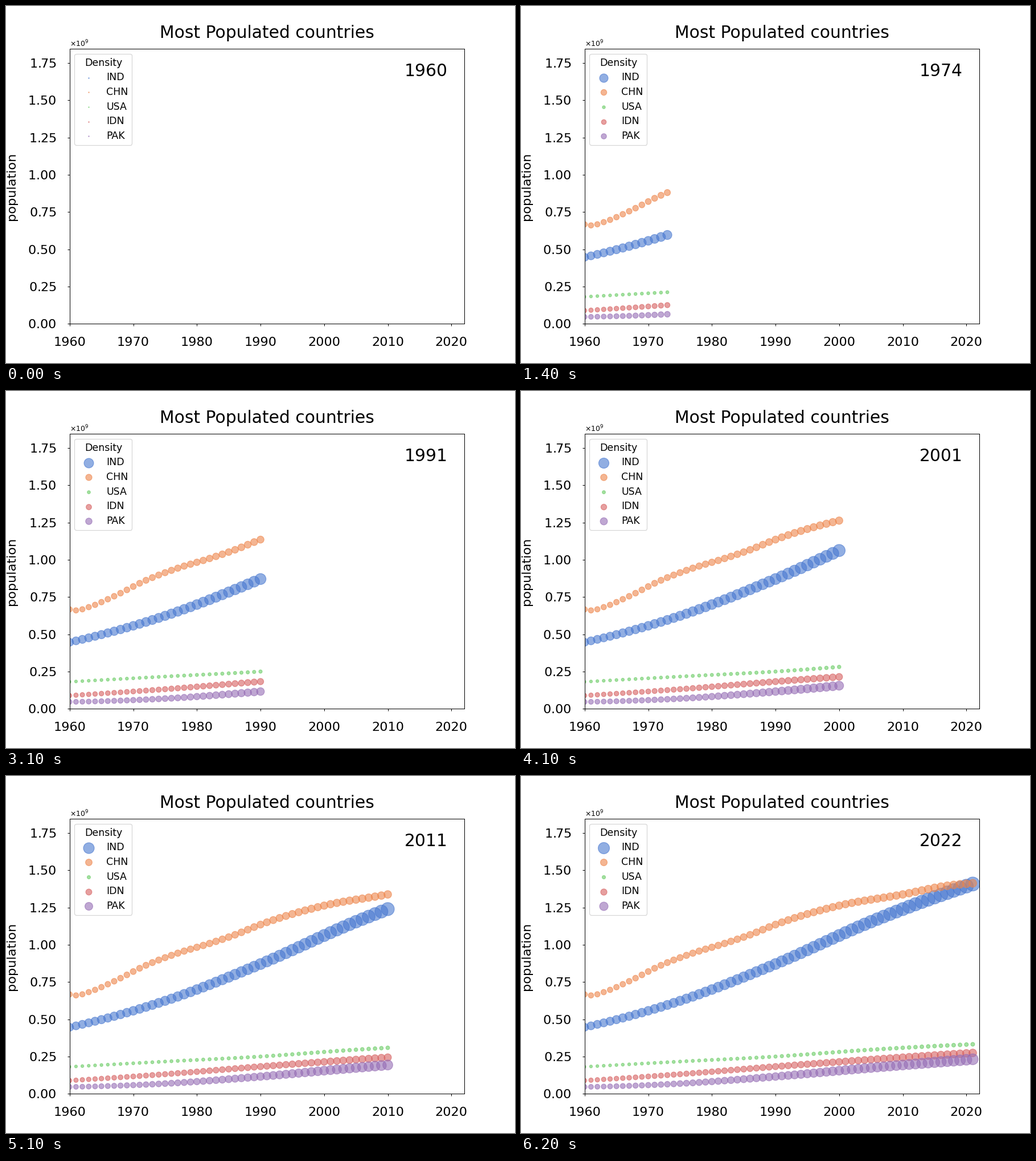
Write a matplotlib script that moves like this. It is 894x626 px and loops after 6300 ms.

```python
import numpy as np
import matplotlib.pyplot as plt
from matplotlib.animation import FuncAnimation
from matplotlib.ticker import MultipleLocator, ScalarFormatter

plt.rcParams["font.family"] = "DejaVu Sans"

DPI = 89.4
YEARS = np.arange(1960, 2022)
SIZE_SCALE = 0.82  # marker area per person per square km

# label: colour, area (million square km), population (millions) at key years
COUNTRIES = {
    "IND": ("#4878D0", 2.973,
            {1960: 446, 1975: 623.5, 1990: 870.5, 2005: 1154.6, 2021: 1407.6}),
    "CHN": ("#EE854A", 9.388,
            {1960: 667, 1961: 660, 1963: 682, 1967: 755, 1972: 862,
             1977: 943.5, 1982: 1008.6, 1986: 1066.8, 1990: 1135.2,
             2000: 1262.6, 2010: 1337.7, 2017: 1396, 2021: 1412.4}),
    "USA": ("#6ACC64", 9.147,
            {1960: 180.7, 1975: 216, 1990: 249.6, 2005: 295.5, 2021: 331.9}),
    "IDN": ("#D65F5F", 1.878,
            {1960: 88.4, 1975: 131.2, 1990: 182.2, 2005: 229, 2021: 273.8}),
    "PAK": ("#956CB4", 0.796,
            {1960: 45.7, 1975: 68.1, 1990: 115.4, 2005: 174.4, 2021: 231.4}),
}


def smooth(keys):
    """Cubic Hermite curve through the key points, sampled every year."""
    x, y = np.array(list(keys.items()), float).T
    slope = np.gradient(y, x, edge_order=2)
    i = np.clip(np.searchsorted(x, YEARS, side="right") - 1, 0, len(x) - 2)
    h = x[i + 1] - x[i]
    t = (YEARS - x[i]) / h
    chord = y[i + 1] - y[i]
    bend = (1 - t) * (h * slope[i] - chord) - t * (h * slope[i + 1] - chord)
    return y[i] + t * chord + t * (1 - t) * bend


fig, ax = plt.subplots(figsize=(894 / DPI, 626 / DPI), dpi=DPI)
ax.set_xlim(1960, 2022)
ax.set_ylim(0, 1.845e9)
ax.xaxis.set_major_locator(MultipleLocator(10))
ax.yaxis.set_major_locator(MultipleLocator(0.25e9))
ax.yaxis.set_major_formatter(ScalarFormatter(useMathText=True))
ax.yaxis.get_offset_text().set_fontsize(10)
ax.tick_params(labelsize=18, pad=15)
ax.set_title("Most Populated countries", fontsize=24, pad=15)
ax.set_ylabel("population", fontsize=18, labelpad=14.6)
year_text = ax.text(0.849, 0.901, "", fontsize=24, transform=ax.transAxes)

series = []
for label, (color, area, keys) in COUNTRIES.items():
    pop = smooth(keys)
    dots = ax.scatter([], [], color=color, alpha=0.6, label=label)
    series.append((dots, np.column_stack([YEARS, pop * 1e6]),
                   SIZE_SCALE * pop / area))

legend = ax.legend(title="Density", loc="upper left", fontsize=14,
                   title_fontsize=14, labelspacing=0.44)


def update(count):
    for (dots, points, sizes), key in zip(series, legend.legend_handles):
        shown = sizes[:count]
        dots.set_offsets(points[:count])
        dots.set_sizes(shown)
        # the key shows the middle of the size range so far
        key.set_sizes([(shown.min() + shown.max()) / 2 if count else 1])
    year_text.set_text(str(1960 + count))


anim = FuncAnimation(fig, update, frames=len(YEARS) + 1, interval=100,
                     init_func=lambda: update(0), repeat=True)
plt.show()
```
